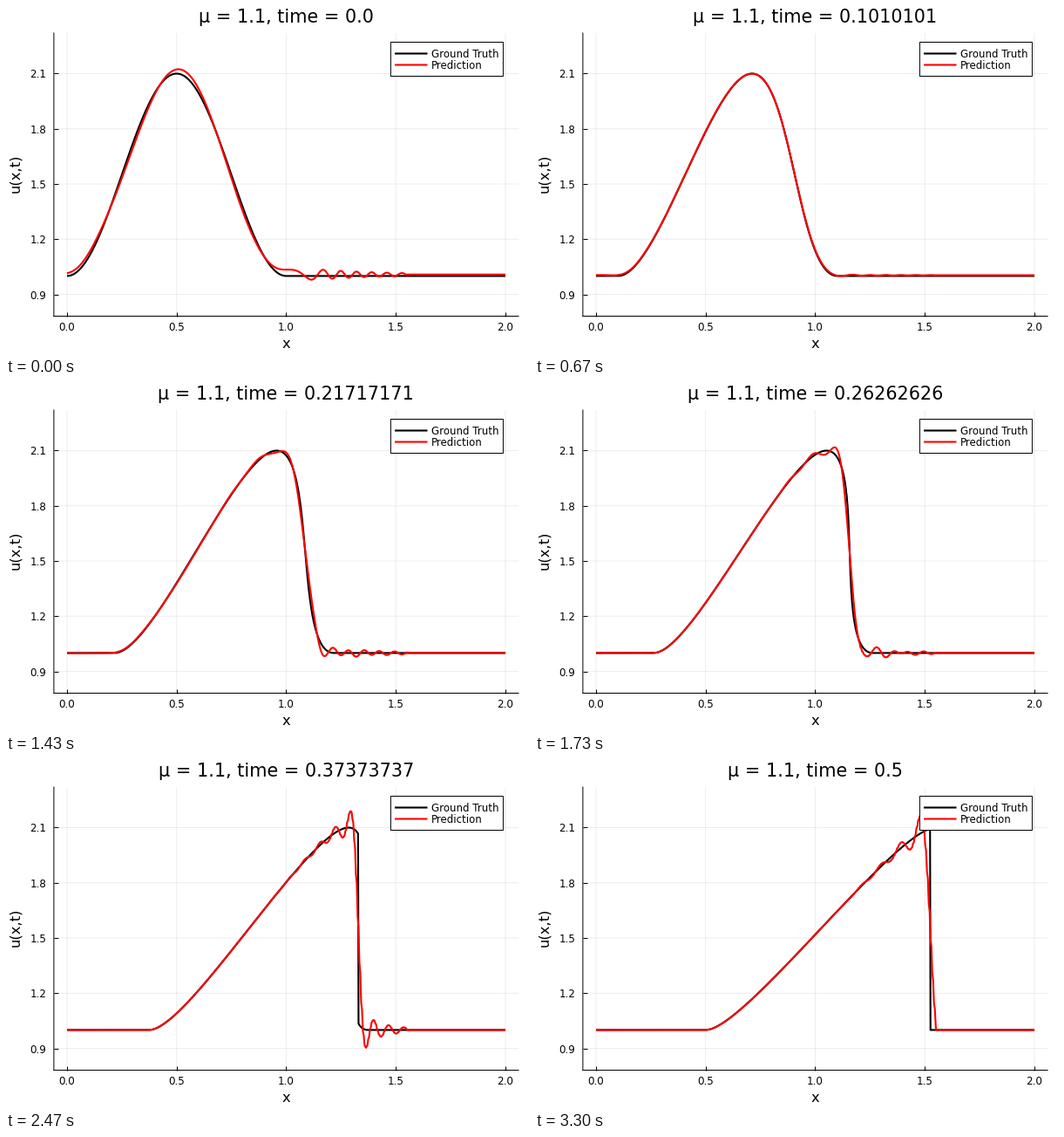
Write a matplotlib script that moves like this. It is 600x400 px and loops after 3.33 s.

```python
import matplotlib.pyplot as plt
import numpy as np
from matplotlib.animation import FuncAnimation
from matplotlib.patches import Rectangle

plt.rcParams["font.family"] = "DejaVu Sans"

W, H, DPI = 600, 400, 100
PT = 72 / DPI  # points per pixel
STEPS, LOOP_MS = 100, 3330
MU, T_END = 1.1, 0.5
X_STOP = 1.552  # the ripples end here

DX = 0.002
x = np.arange(1001) * DX
xi = np.linspace(-0.7, 2.1, 5601)
u0 = 1 + np.where((xi > 0) & (xi < 1), MU * np.sin(np.pi * xi) ** 2, 0)


def time_at(k):
    return T_END * k / (STEPS - 1)


def shock_at(k):
    return 0.75 + (1 + MU / 2) * time_at(k)


def truth(k):
    """Burgers' equation along characteristics, cut at the shock."""
    pos, xs = xi + u0 * time_at(k), shock_at(k)
    first = np.argmax(pos >= xs)
    last = np.nonzero(pos <= xs)[0][-1]
    keep = np.r_[0:first, last + 1:len(xi)]
    return np.interp(x, pos[keep], u0[keep])


def lowpass(u, half_wave):
    """Band-limited copy of u, which rings beside steep fronts."""
    d = np.arange(-250, 251) * DX
    kernel = np.sinc(d / half_wave) * np.hanning(len(d))
    return 1 + np.convolve(u - 1, kernel / kernel.sum(), mode="same")


def chirp(k):
    """Standing ripple, finer to the right, that swings with time."""
    s = 0.05
    phase = (x - 0.3) / 0.25 + 25 * s * np.log1p(np.exp((x - 1.125) / s))
    size = 0.028 * np.exp(-np.maximum(x - 1.15, 0) / 0.3) * np.minimum(1, 0.3 + 3 * x)
    behind = max(0, 1 - k / 50)
    ahead = 1 / (1 + np.exp(-(x - shock_at(k)) / 0.02))
    swing = np.cos(2 * np.pi * k / 85)
    return -size * swing * (behind + (1 - behind) * ahead) * np.cos(np.pi * phase)


def prediction(k, u):
    half_wave = np.interp(k, [43, 66, 95, 99], [0.07, 0.035, 0.035, 0.045])
    p = lowpass(u, half_wave) + chirp(k)
    # small stairs where the shock has passed
    stair = np.where(x > 1.2, 0.0011 * np.sin(2 * np.pi * x / 0.008), 0)
    p = np.where(x < X_STOP, np.interp(x - stair, x, p), u)
    offset = 0.008 * max(0, 1 - k / 43)
    return p + offset * (1 + MU - u) / MU


fig = plt.figure(figsize=(W / DPI, H / DPI), dpi=DPI, facecolor="white")

ax = fig.add_axes([54.9 / W, 1 - 355.5 / H, 533.1 / W, 324.5 / H])
ax.set(xlim=(-0.06, 2.06), ylim=(0.7815, 2.3205),
       xticks=[0, 0.5, 1, 1.5, 2], yticks=[0.9, 1.2, 1.5, 1.8, 2.1])
ax.xaxis.set_major_formatter("{x:.1f}")
ax.yaxis.set_major_formatter("{x:.1f}")
ax.spines[["top", "right"]].set_visible(False)
ax.spines[["left", "bottom"]].set(linewidth=PT, snap=False)
ax.tick_params(direction="in", length=5 * PT, width=PT, labelsize=11.9 * PT)
ax.tick_params(axis="x", pad=6.5 * PT)
ax.tick_params(axis="y", pad=8.5 * PT)
ax.grid(color="black", alpha=0.07, linewidth=PT, snap=False)
ax.set_axisbelow(True)
for tick in ax.xaxis.get_ticklines() + ax.yaxis.get_ticklines():
    tick.set_snap(False)

LINE = dict(linewidth=2.1 * PT, solid_capstyle="butt", solid_joinstyle="round",
            snap=False)
true_line, = ax.plot([], [], color="black", zorder=3, **LINE)
pred_line, = ax.plot([], [], color="red", zorder=4, **LINE)

# Overlay in pixel coordinates
page = fig.add_axes([0, 0, 1, 1], xlim=(0, W), ylim=(H, 0))
page.axis("off")


def put(px, py, text, size, **kw):
    return page.text(px, py, text, fontsize=size * PT, va="baseline", **kw)


title = put(321.3, 19, "", 20.8, ha="center")
put(321.5, 391.7, "x", 16.35, ha="center")
put(15, 191.5, "u(x,t)", 16.35, ha="center", rotation=90, rotation_mode="anchor")

page.add_patch(Rectangle((441.4, 41.5), 129, 39, facecolor="white",
                         edgecolor="black", linewidth=PT, snap=False))
for row, (name, color) in enumerate([("Ground Truth", "black"), ("Prediction", "red")]):
    y = 54.5 + 13 * row
    page.plot([446, 483.5], [y, y], color=color, **LINE)
    put(487.5, y + 4.5, name, 11.8)


def draw(n):
    # two ticks per step, so each step is centred on its own time
    k = min((n + 1) // 2, STEPS - 1)
    u = truth(k)
    true_line.set_data(x, u)
    pred_line.set_data(x, prediction(k, u))
    title.set_text("μ = 1.1, time = " + str(np.float32(time_at(k))))
    return true_line, pred_line, title


anim = FuncAnimation(fig, draw, frames=2 * STEPS, interval=LOOP_MS / (2 * STEPS),
                     repeat=True, repeat_delay=0, blit=False)
plt.show()
```
